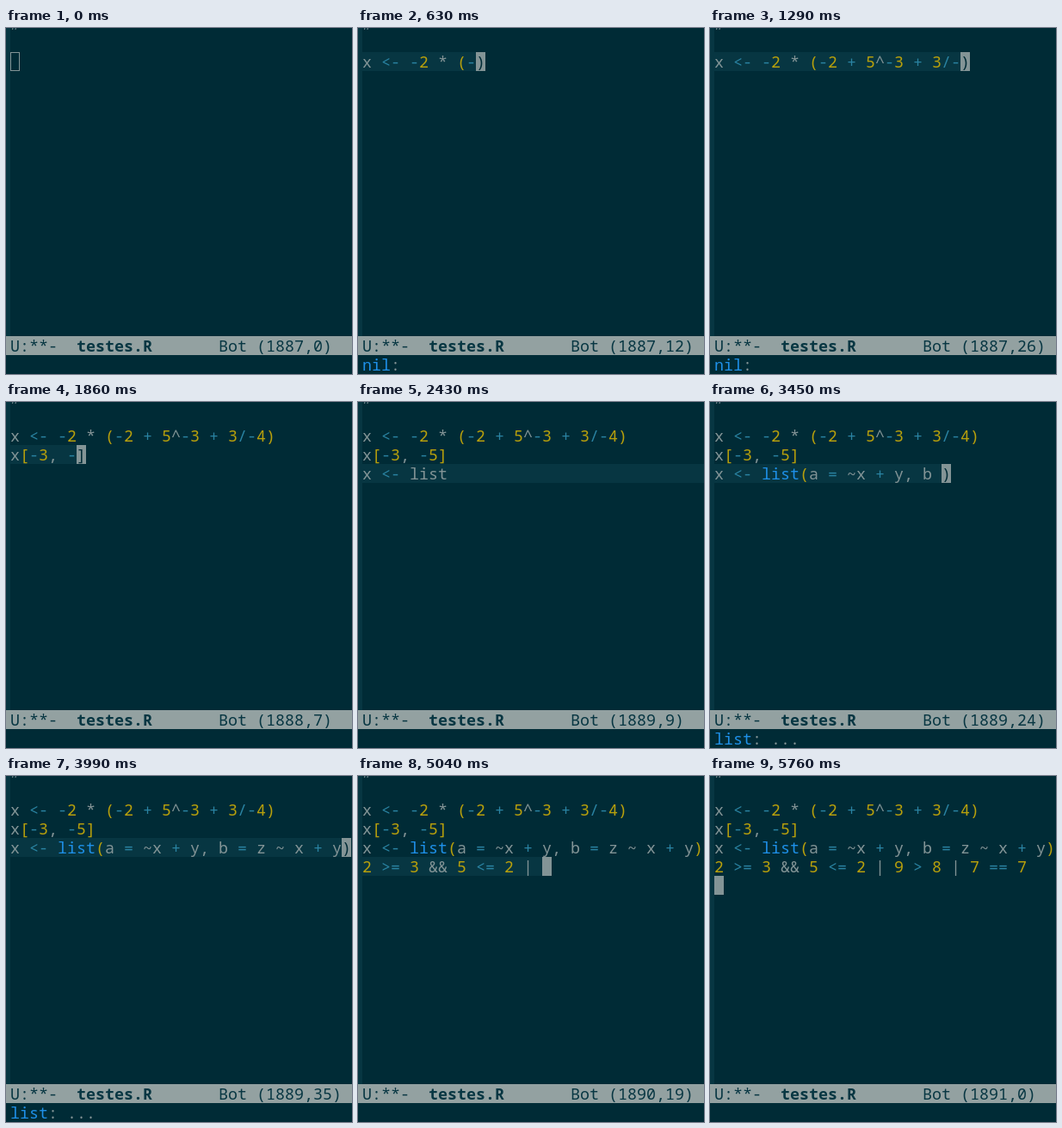
These frames come from a looping animation (402 px wide and 402 px high, 5.79 s). An HTML page with a canvas:

```html
<!DOCTYPE html>
<html lang="en">
<head>
<meta charset="utf-8">
<title>Typing R code</title>
<style>
  html, body { margin: 0; width: 100%; height: 100%; overflow: hidden; background: #002b36; }
  canvas { display: block; }
</style>
</head>
<body>
<canvas id="stage" width="402" height="402"></canvas>
<script>
const ctx = document.getElementById('stage').getContext('2d', { alpha: false });
const CELL = 11, ROW = 22, LEFT = 5, TOP = 28, BAR = 358, STEP = 30, STEPS = 193;
const BG = '#002b36', SHADE = '#073642', TEXT = '#839496', BLUE = '#1e90e8', LIGHT = '#93a1a1';

const lines = [
  'x <- -2 * (-2 + 5^-3 + 3/-4)',
  'x[-3, -5]',
  'x <- list(a = ~x + y, b = z ~ x + y)',
  '2 >= 3 && 5 <= 2 | 9 > 8 | 7 == 7',
  ''
];

// Cursor path: [step, row, column]
const path = [
  [0, 0, 0], [20, 0, 12], [43, 0, 26], [47, 0, 28],
  [50, 1, 0], [65, 1, 9],
  [67, 2, 0], [81, 2, 9], [96, 2, 14], [133, 2, 35], [135, 2, 36],
  [139, 3, 0], [160, 3, 12], [168, 3, 19], [190, 3, 33],
  [192, 4, 0]
];

const syntax = [
  [/^[\d()[\]]/, '#b8a00c'],
  [/^list(?=\()/, BLUE],
  [/^[-+\/=<>]/, '#2a83a2'],
  [/^./, TEXT]
];

function box(x, y, w, h, color) {
  ctx.fillStyle = color;
  ctx.fillRect(x, y, w, h);
}

function write(text, col, y, color, weight = 400) {
  ctx.font = `${weight} 18.33px "Noto Sans Mono", "DejaVu Sans Mono", monospace`;
  ctx.fillStyle = color;
  [...text].forEach((ch, i) => ctx.fillText(ch, LEFT + (col + i) * CELL, y + 18));
}

function writeCode(text, y) {
  for (let col = 0; col < text.length;) {
    const rest = text.slice(col);
    const [pattern, color] = syntax.find(([p]) => p.test(rest));
    const token = rest.match(pattern)[0];
    write(token, col, y, color);
    col += token.length;
  }
}

function cursorAt(step) {
  const i = path.findLastIndex(p => p[0] <= step);
  const [start, row, col] = path[i];
  const next = path[i + 1];
  if (!next || next[1] !== row) return [row, col];
  return [row, col + Math.floor((next[2] - col) * (step - start) / (next[0] - start))];
}

// Brackets are closed automatically as soon as they are opened.
function typed(row, col) {
  const text = lines[row].slice(0, col);
  for (const [open, close] of ['()', '[]'])
    if (text.includes(open) && !text.includes(close)) return text + close;
  return text;
}

function echo(row, col) {
  if (row === 0 && col > 10 && col < 28) return ['nil', ':'];
  if (row === 2 && col > 9 && col < 36) return ['list', ': ...'];
  return ['', ''];
}

function draw(step) {
  const [row, col] = cursorAt(step);
  const current = typed(row, col);
  const completing = current.endsWith('list');
  const x = LEFT + col * CELL, y = TOP + row * ROW;

  box(0, 0, 402, 402, BG);
  box(0, 0, LEFT, BAR, SHADE);
  write('#', 0, -16, '#657b83');
  // The highlight ends with the text, except while a completion hides the cursor.
  box(LEFT, y, completing ? 402 : current.length * CELL, ROW, SHADE);
  for (let r = 0; r < row; r++) writeCode(lines[r], TOP + r * ROW);
  writeCode(current, y);

  if (step === 0) {
    ctx.strokeStyle = TEXT;
    ctx.lineWidth = 1;
    ctx.strokeRect(x + .5, y + .5, CELL - 1, ROW - 1);
  } else if (!completing) {
    box(x, y, CELL, ROW, TEXT);
    write(current[col] || '', col, y, BG);
  }

  box(0, BAR, 402, ROW, LIGHT);
  write('U:**-', 0, BAR, SHADE);
  write('testes.R', 7, BAR, SHADE, 700);
  write(`Bot (${1887 + row},${col})`, 22, BAR, SHADE);

  const [name, hint] = echo(row, col);
  write(name, 0, BAR + ROW, BLUE);
  write(hint, name.length, BAR + ROW, TEXT);
}

function tick() {
  draw(Math.floor(performance.now() / STEP) % STEPS);
  requestAnimationFrame(tick);
}
tick();
</script>
</body>
</html>
```
